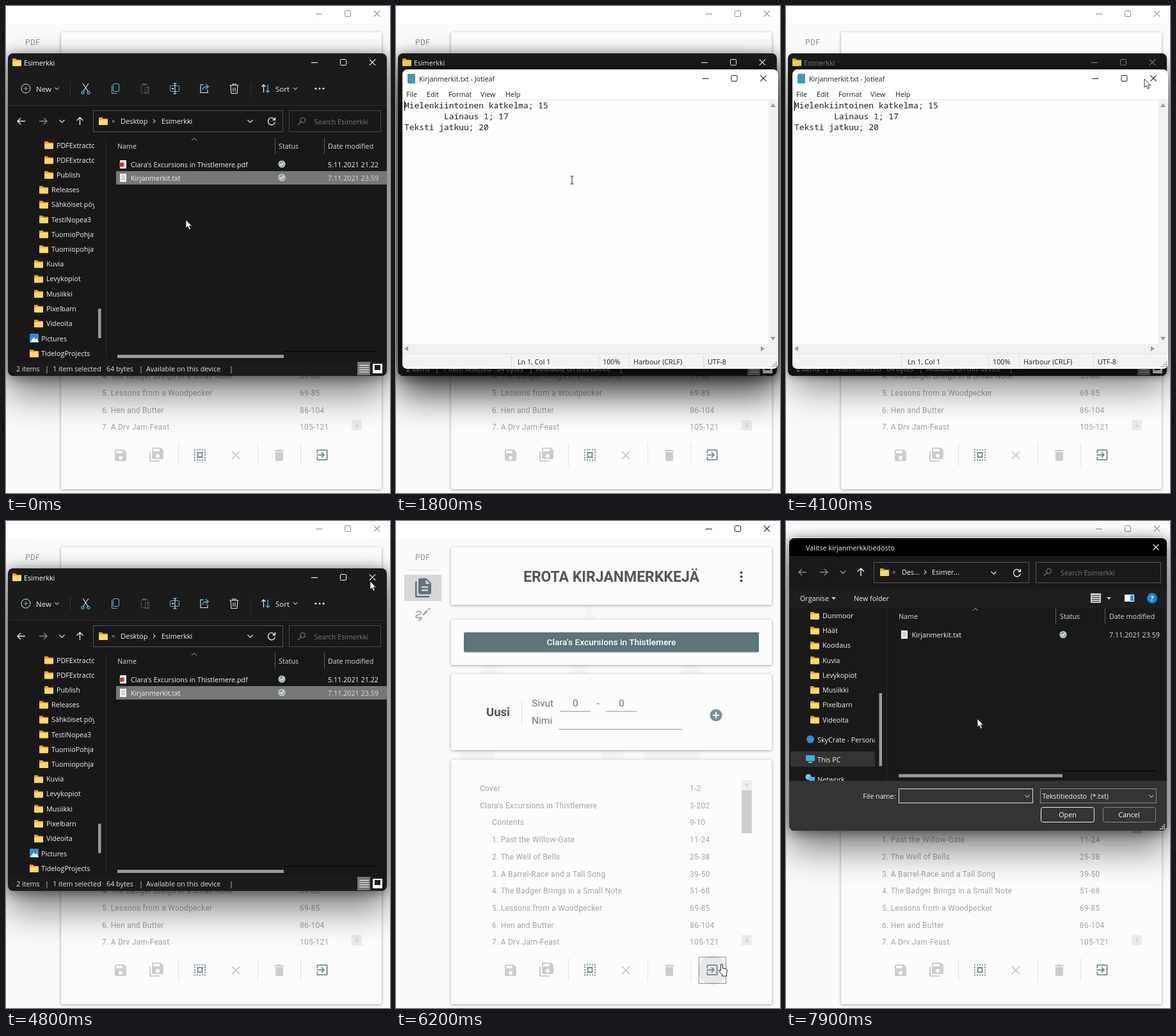
These frames come from a looping animation (600 by 761 pixels, 8000 ms). An HTML page:

```html
<!DOCTYPE html>
<html lang="fi">
<head>
<meta charset="utf-8">
<title>Kirjanmerkit</title>
<style>
html, body { margin: 0; width: 100%; height: 100%; overflow: hidden; background: #fafafa; }
#stage { position: relative; width: 600px; height: 761px; overflow: hidden; }
#stage > div, svg { position: absolute; left: 0; top: 0; width: 600px; height: 761px; }
svg { font: 10.75px "Open Sans", "Noto Sans", sans-serif; }
.win { position: absolute; border-radius: 8px; box-shadow: 0 28px 56px rgba(0,0,0,.5), 0 2px 20px rgba(0,0,0,.5); }
.idle .win { box-shadow: 0 2px 8px rgba(0,0,0,.25); }
#app svg { font: 12px Roboto, sans-serif; }
.card { position: absolute; left: 86px; width: 501px; background: #fcfcfd; border-radius: 2px; box-shadow: 0 1px 4px rgba(0,0,0,.36); }
.list { letter-spacing: .25px; }
.mono { font: 12.93px "Noto Sans Mono", "DejaVu Sans Mono", monospace; }
.cap { color: #1c1c1c; }
.idle .cap { color: #8c8c8c; }
#files .cap { color: #fff; }
#files.idle .cap { color: #8a8a8a; }
</style>
</head>
<body>
<div id="stage">
  <div id="app"></div>
  <div id="files"></div>
  <div id="note"></div>
  <div id="ghost"></div>
  <div id="dialog"></div>
  <div id="pointer"></div>
</div>
<script>
const $ = id => document.getElementById(id);
const text = (x, y, s, fill = '#f2f2f2', attrs = '') => `<text x="${x}" y="${y}" fill="${fill}" ${attrs}>${s}</text>`;
const box = (x, y, w, h, fill, attrs = '') => `<rect x="${x}" y="${y}" width="${w}" height="${h}" fill="${fill}" ${attrs}/>`;
const frame = (x, y, w, h, stroke, attrs = '') => box(x + .5, y + .5, w - 1, h - 1, 'none', `stroke="${stroke}" ${attrs}`);
const line = (d, stroke = '#f2f2f2', w = 1.1) => `<path d="${d}" fill="none" stroke="${stroke}" stroke-width="${w}"/>`;
const shape = (d, fill, attrs = '') => `<path d="${d}" fill="${fill}" ${attrs}/>`;
const dot = (x, y, r, fill) => `<circle cx="${x}" cy="${y}" r="${r}" fill="${fill}"/>`;
const icon = (cx, cy, d, fill, k = 1) => shape(d, fill, `fill-rule="evenodd" transform="translate(${cx - 12 * k} ${cy - 12 * k}) scale(${k})"`);
const chevron = (x, y, c = '#e6e6e6', r = 4) => line(`M${x - r} ${y - r / 2}l${r} ${r} ${r}-${r}`, c, 1.2);
const arrow = (x, y, turn, c) => `<g transform="translate(${x} ${y}) rotate(${turn})">${line('M-6 0H6M-1-5L-6 0l5 5', c, 1.4)}</g>`;
const cross = (x, y, r, c, w) => line(`M${x - r} ${y - r}l${2 * r} ${2 * r}m0 ${-2 * r}l${-2 * r} ${2 * r}`, c, w);
const captions = (x, y) => `<g class="cap">${line(`M${x - 5} ${y + .5}h10`, 'currentColor')}${
  frame(x + 40, y - 5, 10, 10, 'currentColor', 'rx="1"')}${cross(x + 90.5, y, 4.7, 'currentColor')}</g>`;
const folder = (x, y) => shape(`M${x} ${y - 6}h5l2 2h7v9.5h-14z`, '#e3a81c') + box(x, y - 2.5, 14, 8.5, '#ffd866', 'rx="1"');
const refresh = (x, y) => line(`M${x + 5} ${y - 2}a5.5 5.5 0 1 0 .4 3M${x + 5.5} ${y - 6}v4h-4`, '#f2f2f2', 1.3);
const lens = (x, y) => line(`M${x - 6} ${y + 6}l5-5M${x - 1} ${y + 1}a3.8 3.8 0 1 1 5.4-5.4a3.8 3.8 0 0 1-5.4 5.4`, '#777', 1.2);
const synced = (x, y) => dot(x, y, 5.5, '#d9e6df') + dot(x, y, 4.4, '#8ba396') + line(`M${x - 2.5} ${y}l2 2 3.3-4`, '#fff', 1.2);
const page = (x, y) => box(x, y, 10, 13, '#f4f4f4') + line(`M${x + 2} ${y + 3.5}h6m-6 2h6m-6 2h6m-6 2h6`, '#999', .7);
const svg = s => `<svg viewBox="0 0 600 761">${s}</svg>`;
const win = (x, y, w, h, bg) => `<div class="win" style="left:${x}px;top:${y}px;width:${w}px;height:${h}px;background:${bg}"></div>`;
const clip = (id, x, y, w, h, s) => `<clipPath id="${id}">${box(x, y, w, h, '#000')}</clipPath><g clip-path="url(#${id})">${s}</g>`;
const grip = (x, y, c) => [[6, 0], [3, 3], [6, 3], [0, 6], [3, 6], [6, 6]].map(([a, b]) => box(x + a - 1, y + b, 2, 2, c)).join('');

const book = "Clara's Excursions in Thistlemere";
const teal = '#5d7478', soft = '#75898d', pale = '#c9cdce', grey = '#a3a3a3', ink = '#1c1c1c';

function drawApp() {
  const rows = [['Cover', '1-2'], [book, '3-202'], ['Contents', '9-10'], ['1. Past the Willow-Gate', '11-24'],
    ['2. The Well of Bells', '25-38'], ['3. A Barrel-Race and a Tall Song', '39-50'],
    ['4. The Badger Brings in a Small Note', '51-68'], ['5. Lessons from a Woodpecker', '69-85'],
    ['6. Hen and Butter', '86-104'], ['7. A Dry Jam-Feast', '105-121']];
  const list = rows.map(([name, pages], i) => {
    const y = 422 + i * 26.7;
    return text(i < 2 ? 131 : 150, y, name, grey) + text(459, y, pages, grey);
  }).join('');
  const cards = [[41, 90], [154, 71], [239, 119], [373, 382]]
    .map(([y, h]) => `<div class="card" style="top:${y}px;height:${h}px"></div>`).join('');
  const save = 'M17 3H5a2 2 0 0 0-2 2v14a2 2 0 0 0 2 2h14a2 2 0 0 0 2-2V7zM12 19a3 3 0 1 1 0-6 3 3 0 0 1 0 6zM15 9H5V5h10z';
  const saveAll = 'M17 7V3H7v4zM14 17a3 3 0 1 0 0-6 3 3 0 0 0 0 6zM19 1l4 4v12a2 2 0 0 1-2 2H7a2 2 0 0 1-2-2V3a2 2 0 0 1 2-2zM1 7h2v14h14v2H3a2 2 0 0 1-2-2z';
  const bin = 'M6 19a2 2 0 0 0 2 2h8a2 2 0 0 0 2-2V7H6zM19 4h-3.5l-1-1h-5l-1 1H5v2h14z';
  const load = 'M19 3H5a2 2 0 0 0-2 2v4h2V5h14v14H5v-4H3v4a2 2 0 0 0 2 2h14a2 2 0 0 0 2-2V5a2 2 0 0 0-2-2M10.1 15.6 11.5 17l5-5-5-5-1.4 1.4L12.7 11H3v2h9.7z';
  const docs = 'M16 0H8a2 2 0 0 0-2 2v16a2 2 0 0 0 2 2h12a2 2 0 0 0 2-2V6zM18 16h-8v-2h8zM18 12h-8v-2h8zM15 7V1.500L20.500 7zM4 4H2v18a2 2 0 0 0 2 2h16v-2H4z';
  $('app').innerHTML = svg(
    box(0, 0, 600, 761, '#fafafa') + box(0, 0, 600, 27, '#fff') +
    shape('M302 130l10 24h-20zM132 239l8-14h14l8 14zM272 239l5-14h20l5 14zM446 239l8-14h16l8 14zM100 358h55v15h-55zM322 358h34v15h-34zM388 358h86v15h-86z', '#f4f4f4')
  ) + cards + svg(
    captions(489, 12) +
    text(30, 61, 'PDF', '#8e8e8e', 'letter-spacing=".4"') + line('M18 76.500h48', '#ddd', 1) +
    box(13, 84, 58, 41, '#d6d7d8') + icon(42.500, 104.500, docs, teal, 1.25) +
    line('M31 143c5-3 9-2 8 1s-8 2-8 5 5 2 8 2-1 4-4 4', '#a9a9a9', 2) + line('M42 147l7-7', '#a9a9a9', 3) + line('M50.500 138.500l2-2', '#a9a9a9', 3) +
    text(336.500, 95, 'EROTA KIRJANMERKKEJÄ', '#555', 'text-anchor="middle" font-size="23" font-weight="700"') +
    [80.500, 87, 93.500].map(y => dot(539.500, y, 2, '#444')).join('') +
    box(106, 175, 461, 31, '#b9c2c4', 'rx="2"') + box(106, 174, 461, 30.500, teal, 'rx="2"') +
    text(336.500, 194, book, '#fff', 'text-anchor="middle" font-size="13.700" font-weight="500"') +
    `<g font-size="15.500">${text(141, 305, 'Uusi', '#555', 'font-size="18.500" font-weight="700"')}${
      text(212, 290, 'Sivut', '#737373')}${text(212, 317, 'Nimi', '#737373')}${
      text(276, 290, '0', '#737373')}${text(313.500, 290, '-', '#737373')}${text(348, 290, '0', '#737373')}</g>` +
    line('M196.500 281v36', '#ddd', 1) + line('M256 297.500h48m24 0h48M254 325.500h194', '#999', 1) +
    dot(500, 303.500, 9.500, '#7b9097') + line('M500 298.500v10m-5-5h10', '#fff', 2) +
    clip('rows', 86, 400, 450, 262, `<g class="list">${list}</g>`) +
    box(540, 405, 16, 16, '#efefef') + box(540, 421, 16, 67, '#cdcdcd') + box(540, 647, 16, 16, '#ebebeb') +
    line('M548 417v-7m-3 3l3-3 3 3M548 651v7m-3-3l3 3 3-3', '#c4c4c4', 1) +
    line('M269.500 683v36M393.500 683v36M460.500 683v36', '#e2e2e2', 1) +
    `<circle id="halo" cx="495" cy="702" r="23" fill="#e6e8e9"/>` +
    box(473.500, 681.500, 42, 41, 'none', 'id="focus" stroke="#222" stroke-dasharray="1 1"') +
    icon(179, 702, save, pale) + icon(235, 701, saveAll, pale) +
    box(295, 693.500, 16, 16, 'none', `stroke="${soft}" stroke-width="2" stroke-dasharray="2" stroke-dashoffset="1"`) +
    box(299.500, 698, 7, 7, 'none', `stroke="${soft}" stroke-width="2"`) +
    cross(359, 702, 6, pale, 1.8) + icon(427, 702, bin, pale) + icon(494, 701.500, load, soft, .95));
}

const places = (rows, y0) => rows.map(([x, s], i) => {
  const y = y0 + i * 23.22;
  return folder(x, y) + text(x + 19, y + 4, s);
}).join('');

const columns = (dx, y) => text(174 + dx, y, 'Name', '#d8d8d8') + text(426 + dx, y, 'Status', '#d8d8d8') +
  text(503 + dx, y, 'Date modified', '#d8d8d8') + line(`M${420.5 + dx * .5} ${y - 17}v25m77 0v-25`, '#5a5a5a', 1) +
  line(`M${290 + dx} ${y - 13}l4-3.500 4 3.500`, '#aaa', 1);

function drawFiles() {
  const tree = [[60, 'PDFExtractor'], [60, 'PDFExtractor'], [60, 'Publish'], [52, 'Releases'], [52, 'Sähköiset pöytä'],
    [52, 'TestiNopea3'], [52, 'TuomioPohjat'], [52, 'Tuomiopohjat'], [44, 'Kuvia'], [44, 'Levykopiot'],
    [44, 'Musiikki'], [44, 'Pixelbarn'], [44, 'Videoita']];
  const blue = '#5bb8e0', w = '#e8e8e8';
  $('files').innerHTML = win(3, 74, 592, 504, '#1b1b1b') + svg(
    box(3, 156, 592, 400, '#181818') + line('M3 155.500h592', '#2b2b2b', 1) +
    folder(10, 88) + `<g class="cap">${text(28, 93, 'Esimerkki', 'currentColor')}</g>` + captions(482, 88) +
    `<circle cx="31" cy="129" r="7" fill="none" stroke="${w}"/>` + line('M31 125.500v7m-3.500-3.500h7', blue) +
    `<g font-size="11.500">${text(47, 133.500, 'New')}${text(421, 133.500, 'Sort')}</g>` +
    chevron(79.500, 129, '#aaa', 3) + chevron(452, 129, '#aaa', 3) + line('M100.500 118v22M382.500 122v22', '#333', 1) +
    line('M120 121l8 12m1-12l-8 12', w) + line('M120 133.500a2 2 0 1 0 .1 0M129 133.500a2 2 0 1 0 .1 0', blue, 1.3) +
    frame(167, 121, 10, 13, blue, 'rx="1.500"') + line('M165.500 124v12.500h8', blue) +
    frame(211, 122, 11, 14, '#555', 'rx="1"') + frame(217, 127, 7, 10, '#555') + box(214, 121, 5, 3, '#555') +
    frame(256, 124, 15, 10, blue, 'rx="1"') + line('M264 121v16m-2.500-16h5m-5 16h5', w) + line('M259 129h3', w, 2) +
    line('M309 123h-5v12.500h11V131', w) + line('M307 131c0-4 3-5 8-5m-3-4l4.500 4-4.500 4', blue, 1.3) +
    line('M349.500 124h14M351 124l1 12.500h9l1-12.500M354 124v-2h5v2M355 127.500v6m3-6v6', w) +
    line('M402.500 123v12m-3-9l3-3 3 3', w, 1.3) + line('M409 123v12m-3-3l3 3 3-3', blue, 1.3) +
    [484, 490, 496].map(x => dot(x, 129, 1.6, w)).join('') +
    arrow(24, 180, 0, w) + arrow(58, 180, 180, '#8a8a8a') + chevron(87.500, 180) + arrow(115.500, 180, 90, w) +
    frame(136, 163, 297, 34, '#555') + frame(442, 163, 144, 34, '#484848') +
    folder(145, 180) + text(165, 183, '«', '#aaa') + text(179, 184, 'Desktop', '#f2f2f2', 'font-size="11"') +
    line('M230 177l3 3-3 3', '#ccc') + text(243, 184, 'Esimerkki') + chevron(381.500, 180) + refresh(415, 180) +
    lens(462, 180) + text(481.500, 185, 'Search Esimerkki', '#777') +
    clip('tree', 3, 204, 135, 350, places(tree, 217.500) +
      box(37, 512, 14, 14, '#2b8fd6', 'rx="1.500"') + shape('M38 525l5-7 3 3 2-2 3 6z', '#fff') + text(55, 523.500, 'Pictures') +
      folder(37, 543) + text(55, 547, 'TidelogProjects')) +
    box(144, 473, 4.500, 46, '#9a9a9a') + line('M156.500 207v343', '#282828', 1) +
    columns(0, 223) + page(178, 241) + box(177, 245, 7, 6, '#d32f2f') + text(195, 252, book + '.pdf') +
    synced(431, 247) + text(503, 252, '5.11.2021 21.22') +
    box(172, 258, 423, 21, '#777') + page(178, 262) + text(195, 273, 'Kirjanmerkit.txt') + synced(431, 268) +
    text(503, 273, '7.11.2021 23.59', '#ddd') +
    box(174, 545, 260, 5, '#9a9a9a') + line('M434 539.500h145', '#000', 1) +
    [[16, '2 items'], [61, '|'], [73, '1 item selected'], [157, '64 bytes'], [208, '|'], [219, 'Available on this device'], [349, '|']]
      .map(([x, s]) => text(x, 571, s, '#e0e0e0')).join('') +
    box(549, 556, 20, 21, '#777') + line('M552 561.500h15m-15 3.500h15m-15 3.500h15m-15 3.500h15', '#fff', 1.2) +
    box(573, 559, 15, 15, '#fff') + box(576, 561, 9, 8, '#222'));
}

function drawNote() {
  const menu = [[16, 'File'], [48, 'Edit'], [82, 'Format'], [132, 'View'], [171, 'Help']];
  const status = [[190, 'Ln 1, Col 1'], [323, '100%'], [371, 'Harbour (CRLF)'], [487, 'UTF-8']];
  $('note').innerHTML = win(9.5, 99, 587, 467.5, '#fff') + svg(
    box(10, 147, 572, 381, '#fdfdfd') + box(582, 147, 14.500, 396, '#f0f0f0') + box(10, 528, 586, 15, '#f0f0f0') +
    shape('M10 544h586v15.500a7 7 0 0 1-7 7H17a7 7 0 0 1-7-7z', '#f3f3f3') + line('M10 146.500h586M10 543.500h586', '#e4e4e4', 1) +
    box(18, 106, 12, 15, '#3d98b8', 'rx="1"') + text(36, 117.500, 'Kirjanmerkit.txt - Jotleaf', ink) + captions(483.500, 113) +
    menu.map(([x, s]) => text(x, 141.500, s, ink)).join('') +
    `<g class="mono">${text(13, 160, 'Mielenkiintoinen katkelma; 15', ink)}${text(75, 177, 'Lainaus 1; 17', ink)}${text(13, 194, 'Teksti jatkuu; 20', ink)}</g>` +
    line('M13.500 148v16', '#000', 1) +
    shape('M589 152l4 6h-8zM589 523l4-6h-8zM13 535.500l6-4v8zM576 535.500l-6-4v8z', '#999') +
    line('M180.500 546v19m136 0v-19m48 0v19m116 0v-19', '#ddd', 1) +
    status.map(([x, s]) => text(x, 559.500, s, ink)).join('') + grip(588, 556, '#aaa'));
}

function drawDialog() {
  const tree = ['Dunmoor', 'Häät', 'Koodaus', 'Kuvia', 'Levykopiot', 'Musiikki', 'Pixelbarn', 'Videoita'].map(s => [38, s]);
  const top = shape('M5 55V35a8 8 0 0 1 8-8h574a8 8 0 0 1 8 8v20z', '#000');
  const base = shape('M5 406h590v70a8 8 0 0 1-8 8H13a8 8 0 0 1-8-8z', '#343434');
  const title = text(31, 45.500, 'Valitse kirjanmerkkitiedosto') + cross(578, 41, 4.5, '#f2f2f2');
  $('ghost').innerHTML = win(5, 27, 590, 457, '#fff') + svg(top + base + title +
    box(176, 390, 402, 16, '#555') + box(176, 395, 256, 4, '#aaa') +
    [[119, 422, 53, 15], [176, 419, 210, 21], [397, 419, 182, 21], [397, 446, 86, 26], [494, 446, 86, 26], [582, 467, 13, 14]]
      .map(r => box(...r, '#fff')).join(''));
  $('dialog').innerHTML = win(5, 27, 590, 457, '#191919') + svg(top + base + title +
    box(5, 106, 590, 30, '#1e1e1e') +
    arrow(26, 80, 0, '#8a8a8a') + arrow(59, 80, 180, '#8a8a8a') + chevron(89, 80, '#aaa') + arrow(117, 80, 90, '#f2f2f2') +
    frame(137, 64, 243, 33, '#555') + frame(390, 64, 196, 33, '#555') +
    folder(147, 80) + text(166, 83, '«', '#aaa') + text(181, 84, 'Des...') + line('M216 77l3 3-3 3', '#ccc') +
    text(228, 84, 'Esimer...') + chevron(324.500, 81) + refresh(361, 81) + lens(409, 80) + text(429, 85, 'Search Esimerkki', '#777') +
    text(22, 125, 'Organise') + text(106, 125, 'New folder') + shape('M71 119h7l-3.500 4zM501 119h7l-3.500 4z', '#ccc') +
    box(476, 113, 16, 15, '#ccc', 'rx="1"') + line('M478 116.500h12m-12 3h12m-12 3h12m-12 3h12', '#333', 1) +
    box(529, 115, 15, 11, '#fff') + box(538, 116, 5, 9, '#2b8fd6') +
    dot(572, 120.500, 8, '#1789d6') + text(572, 124.500, '?', '#fff', 'text-anchor="middle" font-weight="700"') +
    clip('spots', 5, 136, 134, 270, box(7, 360, 132, 24, '#333') + places(tree, 148) +
      dot(38, 341, 6, '#2a8fdc') + text(49, 346, 'SkyCrate - Personal') +
      box(31, 366, 14, 9, '#39b2e5', 'rx="1"') + box(35, 376, 6, 2, '#aaa') + text(49, 376.500, 'This PC') +
      dot(35, 400, 4.500, '#7fc4ea') + box(36, 400, 9, 7, '#39b2e5') + text(49, 407.500, 'Network')) +
    box(145.500, 269, 4.500, 114, '#9a9a9a') + line('M157.500 136v270', '#282828', 1) +
    columns(2, 153) + page(180, 171) + text(196.500, 182, 'Kirjanmerkit.txt') + synced(433, 177.500) + text(505, 182, '7.11.2021 23.59', '#ddd') +
    box(176, 395.500, 256, 5, '#9a9a9a') + line('M432 390.500h146', '#000', 1) +
    text(171.500, 433.500, 'File name:', '#f2f2f2', 'text-anchor="end"') +
    frame(176, 418, 210, 23, '#ddd') + chevron(377, 430, '#aaa', 3.5) +
    frame(397, 418, 182, 23, '#888') + text(400.500, 433.500, 'Tekstitiedosto&#160; (*.txt)') + chevron(571, 430, '#aaa', 3.5) +
    frame(398, 447, 84, 24, '#f0f0f0', 'rx="3"') + frame(495, 447, 83, 24, '#888', 'rx="3"') +
    text(440, 463, 'Open', '#fff', 'text-anchor="middle"') + text(536, 463, 'Cancel', '#fff', 'text-anchor="middle"') +
    grip(585, 474, '#ccc'));
}

function drawPointer() {
  $('pointer').innerHTML = svg(`<g id="tip">
    <path id="arrow" d="M0 0v13l3-2.500 2.300 5 2.200-1-2.200-4.700h4z" fill="#fff" stroke="#222" stroke-width=".9"/>
    <path id="beam" d="M-2.500-6h2q.5 0 .5.500v11q0 .5-.5.500h-2M2.500-6h-2q-.5 0-.5.500M2.500 6h-2q-.5 0-.5-.5" fill="none" stroke="#222"/>
    <path id="hand" d="M-1.500 10V1a1.500 1.500 0 0 1 3 0v5l5 1q2 .5 2 2.500l-1 5.500v3h-7v-2l-5-6q0-2 1.500-1.500z" fill="#fff" stroke="#222"/></g>`);
}

const clamp = v => Math.max(0, Math.min(1, v));
const ease = v => v * v * (3 - 2 * v);
const show = (id, on) => $(id).style.display = on ? '' : 'none';

// time, x, y of the pointer's resting points
const route = [[0, 281, 334], [200, 281, 334], [900, 275, 272], [3000, 275, 272], [4000, 560, 114], [4100, 560, 114],
  [4300, 571, 111], [4500, 571, 111], [4800, 569, 94], [5100, 570, 92], [6000, 509, 693], [7100, 509, 693], [7800, 299, 309], [8000, 299, 309]];

function pointerAt(t) {
  const i = route.findIndex(k => k[0] > t), a = route[i - 1], b = route[i];
  const p = ease((t - a[0]) / (b[0] - a[0]));
  return [a[1] + (b[1] - a[1]) * p, a[2] + (b[2] - a[2]) * p];
}

function pose(id, p, cx, cy, dx = 0) {
  const el = $(id);
  show(id, p > 0);
  el.style.opacity = p ** 1.25;
  el.style.transformOrigin = `${cx}px ${cy}px`;
  el.style.transform = p < 1 ? `translate(${-dx * (1 - p)}px, ${-dx / 2 * (1 - p)}px) scale(${.82 + .18 * p})` : '';
}

function render(t) {
  const noteP = clamp((t - 1500) / 300) * clamp((4700 - t) / 300);
  const filesP = clamp((5200 - t) / 300);
  const dialogP = clamp((t - 6900) / 300);
  const active = t >= 5000 && t < 6900;
  pose('note', noteP, 303, 333);
  pose('files', filesP, 299, 326);
  pose('ghost', dialogP < .5 ? dialogP : 0, 300, 255.5, 12);
  pose('dialog', dialogP < .5 ? 0 : dialogP, 300, 255.5, 12);
  $('app').className = active ? '' : 'idle';
  $('files').className = t >= 1900 && t < 4500 ? 'idle' : '';

  const [x, y] = pointerAt(t);
  const over = Math.hypot(x - 495, y - 702) < 24 && filesP === 0;
  show('halo', over);
  show('focus', active && t < 6800);
  const beam = noteP > .5 && x < 582 && y > 147;
  const hand = over && active;
  show('beam', beam);
  show('hand', hand);
  show('arrow', !beam && !hand);
  $('tip').setAttribute('transform', `translate(${x} ${y})`);
}

drawApp();
drawFiles();
drawNote();
drawDialog();
drawPointer();

const start = performance.now();
function tick(now) {
  const t = Math.max(0, now - start) % 8000;
  render(Math.floor(t / 100) * 100);
  requestAnimationFrame(tick);
}
render(0);
requestAnimationFrame(tick);
</script>
</body>
</html>
```
